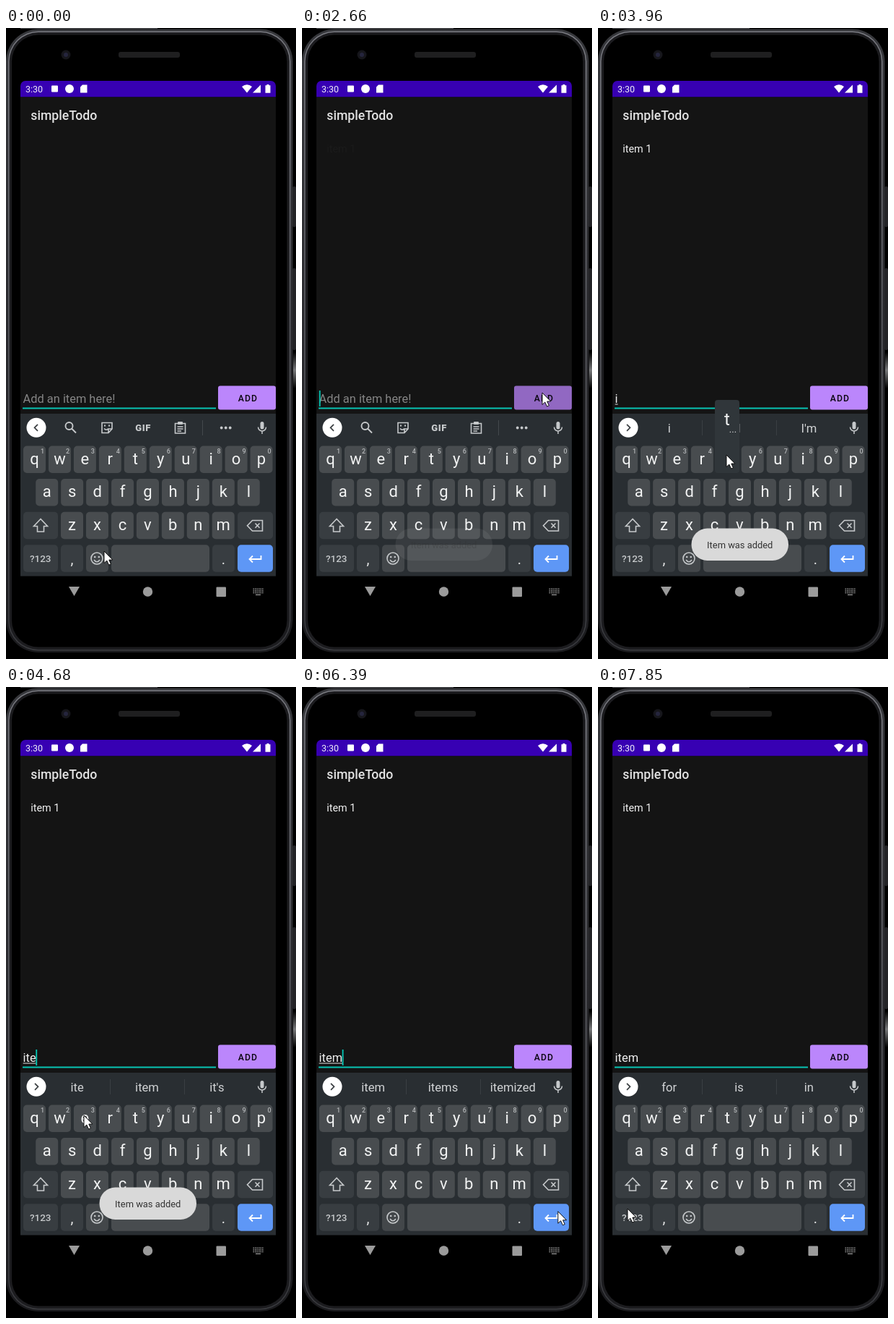
An HTML page with a canvas for the animation above (8000 ms loop, 402 by 872 pixels).

```html
<!DOCTYPE html>
<html lang="en">
<head>
<meta charset="utf-8">
<title>simpleTodo</title>
<style>
html, body { margin: 0; width: 100%; height: 100%; overflow: hidden; background: #000 }
canvas { display: block }
</style>
</head>
<body>
<canvas id="stage" width="402" height="872"></canvas>
<script>
const ctx = document.getElementById('stage').getContext('2d');
const LOOP = 8000, GREY = '#c6c9cb', KEY = '#484c4f', DARK_KEY = '#383d41';

// time, field text, suggestions, underlined characters
const typing = [
  [0, '', '', 0],
  [520, 'i', "i,I,I'm", 1],
  [640, 'it', "it,it's,its", 2],
  [770, 'ite', "ite,item,it's", 3],
  [900, 'item', "ite,item,it's", 3],
  [1120, 'item', 'item,items,itemized', 4],
  [1240, 'item ', 'for,is,in', 0],
  [1490, 'item 1', '1,1st,10', 0],
  [2600, '', '', 0],
  [3440, 'i', "i,I,I'm", 1],
  [4080, 'it', "it,it's,its", 2],
  [4560, 'ite', "ite,item,it's", 3],
  [5040, 'item', "ite,item,it's", 3],
  [5470, 'item', 'item,items,itemized', 4],
  [7300, 'item ', 'for,is,in', 0]
];

// time, x, y of the pointer tip
const pointer = [
  [0, 136, 723], [1600, 136, 723], [2460, 333, 504], [2900, 333, 504],
  [3320, 284, 590], [3480, 284, 590], [3820, 178, 590], [4080, 178, 590],
  [4440, 108, 592], [4600, 108, 592], [4840, 301, 690], [5460, 301, 690],
  [5470, 251, 710], [5750, 251, 710], [6400, 357, 725], [6840, 357, 725],
  [6960, 230, 737], [7300, 230, 737], [7590, 20, 735], [7840, 41, 721], [8000, 41, 721]
];

// letter, key centre, press and release time
const previews = [['i', 284, 3320, 3440], ['t', 179, 3830, 4080], ['e', 109, 4440, 4560]];

function box(x, y, w, h, color, r = 0) {
  ctx.fillStyle = color;
  ctx.beginPath();
  ctx.roundRect(x, y, w, h, r);
  ctx.fill();
}

function dot(x, y, r, color) {
  box(x - r, y - r, 2 * r, 2 * r, color, r);
}

function text(s, x, y, size, color, align = 'left', weight = 400, spacing = 0) {
  ctx.font = `${weight} ${size}px Roboto, sans-serif`;
  ctx.letterSpacing = spacing + 'px';
  ctx.textAlign = align;
  ctx.fillStyle = color;
  ctx.fillText(s, x, y);
}

function line(d, color = GREY, width = 1.6) {
  ctx.strokeStyle = color;
  ctx.lineWidth = width;
  ctx.stroke(new Path2D(d));
}

function shape(d, color) {
  ctx.fillStyle = color;
  ctx.fill(new Path2D(d));
}

function shade(top, bottom, ...colors) {
  const gradient = ctx.createLinearGradient(0, top, 0, bottom);
  colors.forEach((c, i) => gradient.addColorStop(i / (colors.length - 1), c));
  return gradient;
}

function drawPhone() {
  box(0, 0, 402, 872, '#000');
  box(20, 0, 190, 1, '#55565a');
  box(397, 219, 5, 56, '#232326', 2);
  box(397, 332, 5, 113, '#232326', 2);
  box(398, 448, 4, 50, shade(448, 498, '#000', '#77787a', '#000'));
  box(0, 1.5, 397.5, 861.5, shade(0, 863, '#37383c', '#29292d', '#1b1b1e'), 45);
  box(3, 4.5, 391.5, 856, shade(0, 863, '#7b7c83', '#5a5b61', '#3a3b3f'), 42);
  box(4.6, 6.1, 388.3, 852.8, '#1c1c1f', 40);
  box(8, 9.5, 381.5, 846, '#000', 37);
  box(156, 33, 85, 8, '#1f1f20', 3);
  dot(83, 37, 6.5, '#16161b');
  dot(83, 37, 3, '#25253d');

  box(20, 73, 354, 22.5, '#3700b3', [7, 7, 0, 0]);
  text('3:30', 27, 88.5, 12.5, '#f3effa');
  box(63, 79.5, 9, 9, '#fff', 1);
  dot(88, 84, 6, '#fff');
  shape('M106 78.5H112.5V89.5H103V81.5Z', '#fff');
  shape('M327 81Q334 75.5 341 81L334 89.5Z', '#fff');
  shape('M353 78.5V89.5H342Z', '#fff');
  shape('M361.5 78H364.5V79.3H366.5V89.7H359.5V79.3H361.5Z', '#fff');

  box(20, 95.5, 354, 437.5, '#141414');
  text('simpleTodo', 34.3, 126.7, 17.7, '#e2e2e2', 'left', 500);

  shape('M87 772H102L94.5 785Z', '#9b9b9b');
  dot(196.5, 779, 6.7, '#9b9b9b');
  box(291.5, 772.5, 13.5, 13.5, '#9b9b9b', 1);
  for (let row = 0; row < 3; row++)
    for (let col = 0; col < 6; col++) box(342.5 + col * 2.5, 774.5 + row * 2.6, 1.6, 1.6, '#8d8d8d');
  box(346, 782.6, 7, 1.4, '#8d8d8d');
}

function drawKeyRow(letters, x, y, digits) {
  [...letters].forEach((letter, i) => {
    const left = x + i * 34.95;
    box(left, y, 31, 37.5, KEY, 5);
    text(letter, left + 15.5, y + 25.2, 22, '#f2f3f3', 'center');
    if (digits) text((i + 1) % 10, left + 26.5, y + 10.5, 9, '#b4b7b9', 'center', 500);
  });
}

function drawKeyboard(spacePressed) {
  box(20, 533, 354, 224.5, '#292e32');
  drawKeyRow('qwertyuiop', 24, 577.5, true);
  drawKeyRow('asdfghjkl', 41.2, 623);
  drawKeyRow('zxcvbnm', 76, 668.7);
  for (const [x, y, w] of [[24, 668.7, 48], [321, 668.7, 49], [24, 714.3, 48], [76, 714.3, 31], [286, 714.3, 31]])
    box(x, y, w, 37.5, DARK_KEY, 5);
  box(111, 714.3, 31, 37.5, '#43474a', 5);
  box(146, 714.3, 136, 37.5, spacePressed ? '#5c6063' : KEY, 5);
  box(321, 714.3, 49, 37.5, '#5e97f6', 5);

  line('M48 678.5L38.5 688.5H43.5V696H52.5V688.5H57.5Z');
  line('M341.5 680.5H355.5V695H341.5L334.5 687.7ZM345.5 684.5L351.5 690.7M351.5 684.5L345.5 690.7');
  text('?123', 47.7, 738, 13.5, GREY, 'center', 500);
  text(',', 91.5, 741, 20, '#e6e7e7', 'center');
  text('.', 301.5, 741, 20, '#e6e7e7', 'center');
  line('M134 733A8 8 0 1 1 118 733A8 8 0 1 1 134 733M122 735Q126 740.5 130 735');
  dot(123.2, 731, 1.3, GREY);
  dot(128.8, 731, 1.3, GREY);
  line('M353.5 729V734H338M342 729.5L337.5 734L342 738.5', '#fff', 1.8);
}

function drawStrip(suggestions) {
  dot(42, 552.3, 13.5, '#fff');
  line(suggestions ? 'M40 547.8L44.5 552.3L40 556.8' : 'M44 547.8L39.5 552.3L44 556.8', '#3c4043', 1.7);
  box(352.5, 544, 5, 10.5, GREY, 2.5);
  line('M349.5 551.5A5.5 5.5 0 0 0 360.5 551.5M355 557V561', GREY, 1.5);
  if (suggestions) {
    suggestions.split(',').forEach((word, i) => text(word, 98.7 + i * 96.8, 558.7, 16.6, '#d2d4d6', 'center'));
    box(144, 542, 1, 21, '#3a3f43');
    box(247, 542, 1, 21, '#3a3f43');
    return;
  }
  line('M92.5 550A5 5 0 1 1 82.5 550A5 5 0 1 1 92.5 550M91 553.5L97 559.5', GREY, 1.9);
  line('M133 545.5H147V554L142 559.5H133ZM147 554H142V559.5M136 553.5Q139 557 142 553.5');
  box(136, 548.5, 2, 2, GREY);
  box(142, 548.5, 2, 2, GREY);
  text('GIF', 190.2, 557, 13, GREY, 'center', 900, 0.6);
  line('M234.5 546.5H248.5V560H234.5ZM237.5 551H245.5M237.5 554H245.5M237.5 557H243');
  box(238, 544, 7, 4, GREY, 1);
  box(272, 542, 1, 21, '#44494d');
  for (const x of [298.7, 304.7, 310.7]) dot(x, 552.5, 1.9, GREY);
}

function drawField(t, state, changed) {
  const [, value, , underlined] = state, left = 23.6, size = 16.4;
  text(value || 'Add an item here!', left, 518.3, size, value ? '#f1f1f1' : '#858585');
  const widthOf = s => ctx.measureText(s).width;
  if (underlined) box(left, 519.5, widthOf(value.slice(0, underlined)), 1, '#e4e4e4');
  if ((t - changed) % 1000 < 500) box(left + widthOf(value) - (value ? 0.3 : -0.2), 501, 1.8, 22, '#03c9b7');
  box(23, 524.5, 268, 2, '#08c4b3');
  box(294, 494.5, 80, 33, t >= 2540 && t < 2900 ? '#9168c2' : '#bb86fc', 3);
  text('ADD', 335.5, 516, 12.2, '#0a0610', 'center', 500, 1.1);
}

function drawPreview(t) {
  for (const [letter, x, from, to] of previews) {
    if (t < from || t >= to) continue;
    box(x - 17, 514, 34, 101, '#30363a', 4);
    text(letter, x, 549, 24, '#f2f3f3', 'center');
    text('...', x + 8, 559, 13, '#e0e2e3', 'center');
  }
}

function drawAdded(t) {
  const step = Math.floor((t - 2660) / 120);
  if (step < 0) return;
  ctx.globalAlpha = step ? 1 : 0.03;
  text('item 1', 34.2, 172, 14.4, '#f1f1f1');
  const toast = t >= 5040 ? 0 : t >= 4920 ? 0.25 : t >= 4800 ? 0.6 : Math.min(1, 0.08 + 0.4 * step);
  ctx.globalAlpha = toast;
  box(129.5, 691.5, 134.5, 44.5, '#d9d9d9', 22);
  ctx.globalAlpha = Math.sqrt(toast);
  text('Item was added', 196.7, 718.5, 12.9, '#333', 'center');
  ctx.globalAlpha = 1;
}

function drawPointer(t) {
  const at = Math.max(0, Math.floor((t - 95) / 125) * 125 + 95);
  const i = pointer.findIndex(k => k[0] > at);
  const [t0, x0, y0] = pointer[i - 1], [t1, x1, y1] = pointer[i];
  const p = (at - t0) / (t1 - t0), ease = p * p * (3 - 2 * p);
  ctx.save();
  ctx.translate(x0 + (x1 - x0) * ease, y0 + (y1 - y0) * ease);
  const arrow = 'M0 0V16.5L3.8 13L6.6 19L9.4 17.8L6.8 12H11.8Z';
  shape(arrow, '#fff');
  line(arrow, '#000', 0.9);
  ctx.restore();
}

function draw(t) {
  let state = typing[0], changed = -750;
  for (const next of typing) {
    if (next[0] > t) break;
    if (next[1] !== state[1]) changed = next[0];
    state = next;
  }
  drawPhone();
  drawField(t, state, changed);
  drawKeyboard(t >= 7180 && t < 7300);
  drawStrip(state[2]);
  drawPreview(t);
  drawAdded(t);
  drawPointer(t);
}

const start = performance.now();
function frame() {
  draw((performance.now() - start) % LOOP);
  requestAnimationFrame(frame);
}
frame();
</script>
</body>
</html>
```
